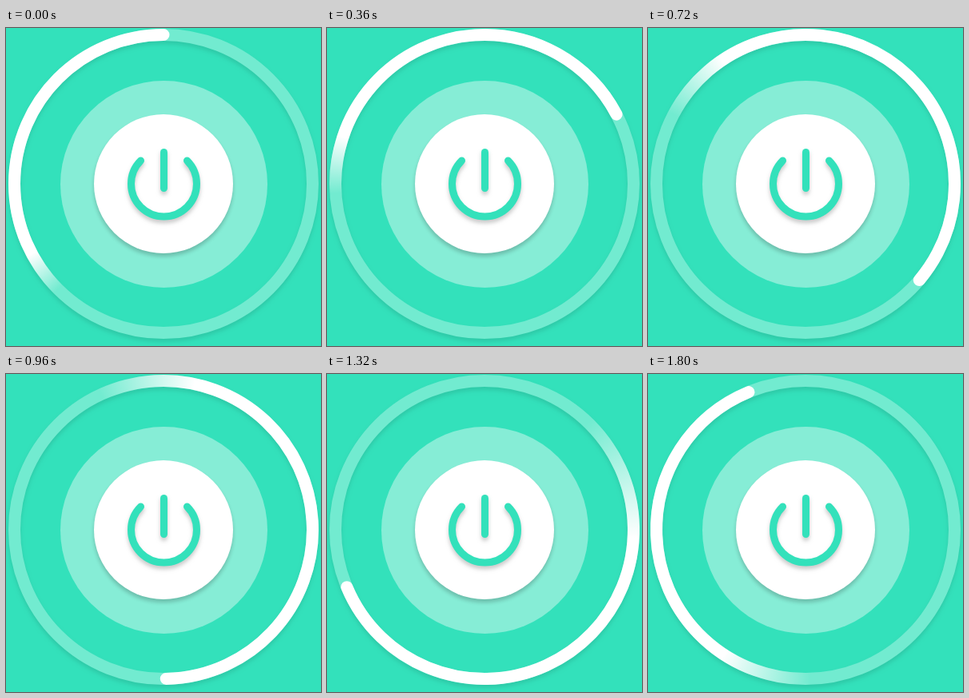
Write an HTML page with a canvas that moves like this. It is 394x398 px and loops after 1.92 s.

```html
<!DOCTYPE html>
<html lang="en">
<head>
<meta charset="utf-8">
<title>Power button</title>
<style>
  html, body { margin: 0; width: 100%; height: 100%; overflow: hidden; background: #33e1bb; }
  canvas { display: block; }
</style>
</head>
<body>
<canvas id="stage" width="394" height="398"></canvas>
<script>
const ctx = document.getElementById('stage').getContext('2d');
const CX = 197, CY = 195, RING = 186.5, RING_WIDTH = 15;
const STEP = 120, STEPS = 16;
const GREEN = '#33e1bb';

// [step, head, faded tail, solid tail], in degrees clockwise from the top
const poses = [
  [0, 0, -135, -118],
  [2, 40.4, -100, -79],
  [5, 105.9, -81, -57],
  [8, 179, -25, 12],
  [10, 224.6, 22, 66],
  [11, 247.4, 44, 93],
  [13, 288.1, 103, 125],
  [15, 337.6, 178, 213],
  [16, 360, 225, 242],
];

const radians = degrees => (degrees - 90) * Math.PI / 180;

function poseAt(step) {
  const next = poses.findIndex(pose => pose[0] > step);
  const a = poses[next - 1], b = poses[next];
  const mix = (step - a[0]) / (b[0] - a[0]);
  return a.slice(1).map((value, i) => value + (b[i + 1] - value) * mix);
}

function shadow(color, blur, offset) {
  ctx.shadowColor = color;
  ctx.shadowBlur = blur;
  ctx.shadowOffsetY = offset;
}

function disc(x, y, radius, color) {
  ctx.fillStyle = color;
  ctx.beginPath();
  ctx.arc(x, y, radius, 0, 2 * Math.PI);
  ctx.fill();
}

function arc(x, y, radius, from, to, width, style) {
  ctx.strokeStyle = style;
  ctx.lineWidth = width;
  ctx.beginPath();
  ctx.arc(x, y, radius, radians(from), radians(to));
  ctx.stroke();
}

function drawIcon() {
  ctx.save();
  shadow('rgba(0, 0, 0, 0.2)', 5, 4);
  arc(197.5, 195, 41, 45, 315, 9, GREEN);
  ctx.beginPath();
  ctx.moveTo(197.5, 155.5);
  ctx.lineTo(197.5, 200.5);
  ctx.stroke();
  ctx.restore();
}

function drawSweep([head, tail, solid]) {
  const fade = ctx.createConicGradient(radians(tail), CX, CY);
  const end = (head - tail + 8) / 360;
  fade.addColorStop(0, 'rgba(255, 255, 255, 0)');
  fade.addColorStop((solid - tail) / 360, '#fff');
  fade.addColorStop(end, '#fff');
  fade.addColorStop(end, 'rgba(255, 255, 255, 0)');
  arc(CX, CY, RING, tail, head, RING_WIDTH, fade);
}

function draw(now) {
  ctx.fillStyle = GREEN;
  ctx.fillRect(0, 0, 394, 398);
  ctx.lineCap = 'round';

  ctx.save();
  shadow('rgba(0, 0, 0, 0.1)', 5, 4);
  arc(CX, CY, RING, 0, 360, RING_WIDTH, '#72ebd0');
  ctx.restore();
  drawSweep(poseAt(Math.floor(now / STEP) % STEPS));

  disc(197.5, 195.5, 129.5, '#86edd6');
  ctx.save();
  shadow('rgba(0, 0, 0, 0.2)', 5, 4);
  disc(CX, CY, 87, '#fff');
  ctx.restore();
  drawIcon();
}

function tick() {
  draw(performance.now());
  requestAnimationFrame(tick);
}
tick();
</script>
</body>
</html>
```
